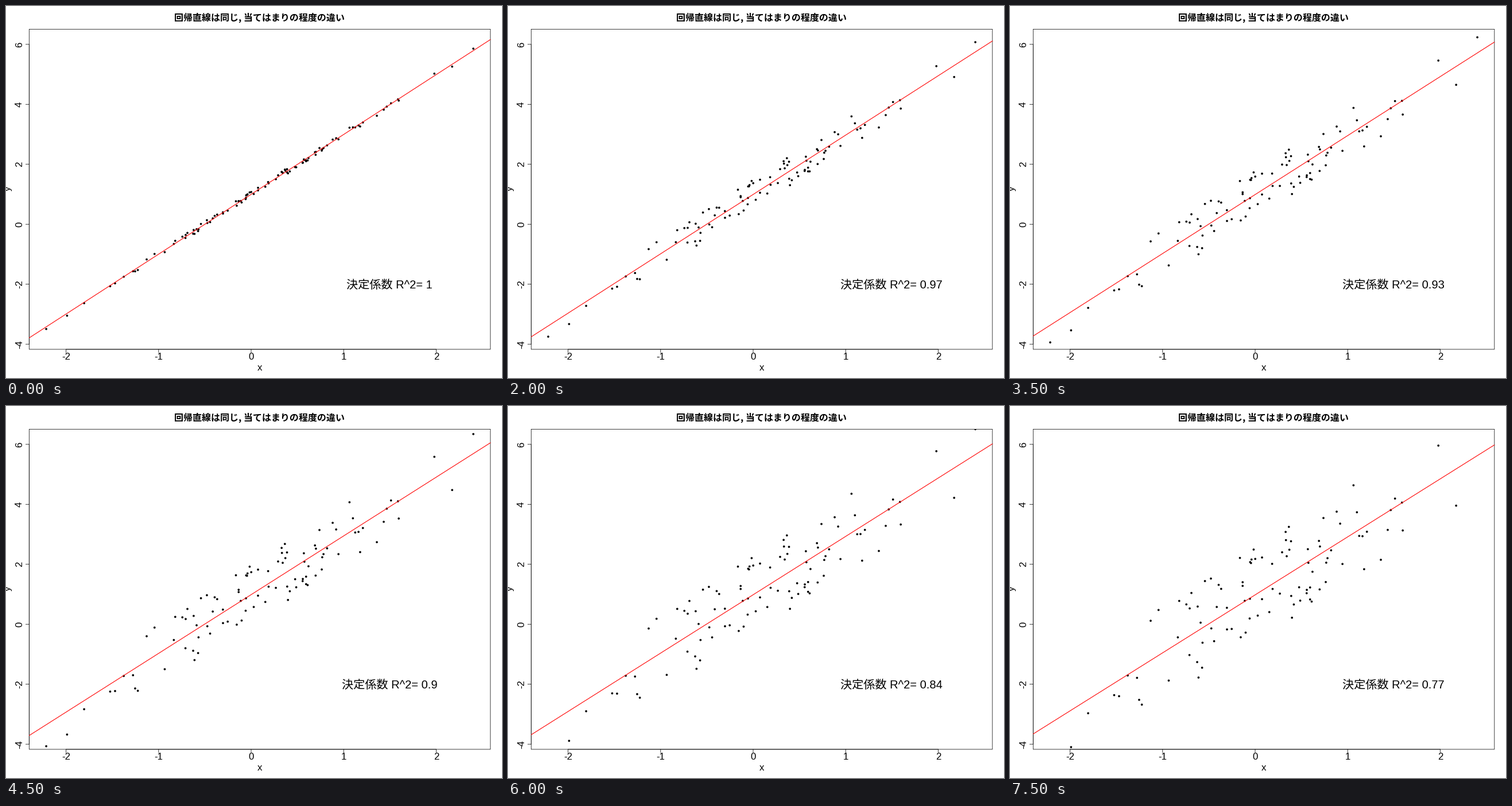
These frames come from a looping animation (864x648 px, 8000 ms). A matplotlib script:

```python
import math
import random

import matplotlib.pyplot as plt
import numpy as np
from matplotlib.animation import FuncAnimation

W, H, DPI = 864, 648, 72          # at 72 dpi one point is one pixel
FRAMES, STEP_MS = 16, 500
N = 100
LEFT, RIGHT, TOP, BOTTOM = 40.32, 843.84, 40.4, 598.0
Y_ZERO, Y_UNIT = 380.2, 52.23
LATIN = ["Liberation Sans", "Noto Sans CJK JP"]


def uniform_source(seed):
    """Mersenne Twister uniforms, seeded by a linear congruential scramble."""
    state = []
    for i in range(675):
        seed = (69069 * seed + 1) % 2**32
        if i > 50:
            state.append(seed)
    rng = random.Random()
    rng.setstate((3, tuple(state) + (624,), None))
    return lambda: rng.getrandbits(32) / 2**32


def normals(seed, n):
    """Normal deviates by inversion of the distribution function."""
    draw = uniform_source(seed)
    big = 2**27
    p = [(int(big * draw()) + draw()) / big for _ in range(n)]
    z = np.linspace(-4, 4, 8001)
    cdf = [0.5 * (1 + math.erf(v / math.sqrt(2))) for v in z]
    return np.interp(p, cdf, z)


x = normals(1, N)
draw = uniform_source(2)
noise = np.array([2 * draw() - 1 for _ in range(N)])

pad = 0.04 * np.ptp(x)
x_lim = np.array([x.min() - pad, x.max() + pad])
x_unit = (RIGHT - LEFT) / np.ptp(x_lim)


def px(v):
    return LEFT + (v - x_lim[0]) * x_unit


def py(v):
    return Y_ZERO - v * Y_UNIT


fig = plt.figure(figsize=(W / DPI, H / DPI), dpi=DPI, facecolor="white")
ax = fig.add_axes([0, 0, 1, 1])
ax.set(xlim=(0, W), ylim=(H, 0))
ax.axis("off")


def line(xs, ys, **kw):
    style = dict(color="black", lw=0.75, snap=False, solid_capstyle="round")
    return ax.plot(xs, ys, **{**style, **kw})[0]


def label(x0, y0, s, size=16.8, **kw):
    style = dict(family=LATIN, ha="center", va="baseline")
    return ax.text(x0, y0, s, fontsize=size, **{**style, **kw})


def side_label(x0, y0, s):
    label(x0, y0, s, rotation=90, rotation_mode="anchor")


def frame(grow=0, **kw):
    return plt.Rectangle((LEFT, TOP), RIGHT - LEFT + grow, BOTTOM - TOP + grow,
                         transform=ax.transData, **kw)


ax.add_patch(frame(fill=False, ec="black", lw=0.75, snap=False))

line([px(-2), px(2)], [BOTTOM, BOTTOM])
for v in range(-2, 3):
    line([px(v)] * 2, [BOTTOM, BOTTOM + 6])
    label(px(v), 616, str(v))

line([LEFT, LEFT], [py(-4), py(6)])
for v in range(-4, 7, 2):
    line([LEFT - 6, LEFT], [py(v)] * 2)
    side_label(28, py(v), str(v))

label(442.1, 635, "x")
side_label(8, 319, "y")
label(441.6, 26, "回帰直線は同じ, 当てはまりの程度の違い", 16,
      family="Noto Sans CJK JP", weight="bold")

dots = ax.scatter(px(x), py(x), s=np.full(N, 3.7**2), c="black",
                  linewidths=0, snap=False)
fit = line([], [], color="red", lw=1.1)
score = label(px(1.5) - 0.7, 491.5, "", 20.16)
for artist in (dots, fit):
    artist.set_clip_path(frame(grow=1))


def update(k):
    y = 1 + 2 * x + 0.1 * (k + 1) * noise
    slope, start = np.polyfit(x, y, 1)
    r2 = np.corrcoef(x, y)[0, 1] ** 2
    dots.set_offsets(np.column_stack([px(x), py(y)]))
    fit.set_data(px(x_lim), py(start + slope * x_lim))
    score.set_text(f"決定係数 R^2= {round(r2, 2):g}")
    return dots, fit, score


anim = FuncAnimation(fig, update, frames=FRAMES, interval=STEP_MS,
                     repeat=True, repeat_delay=0)
plt.show()
```
